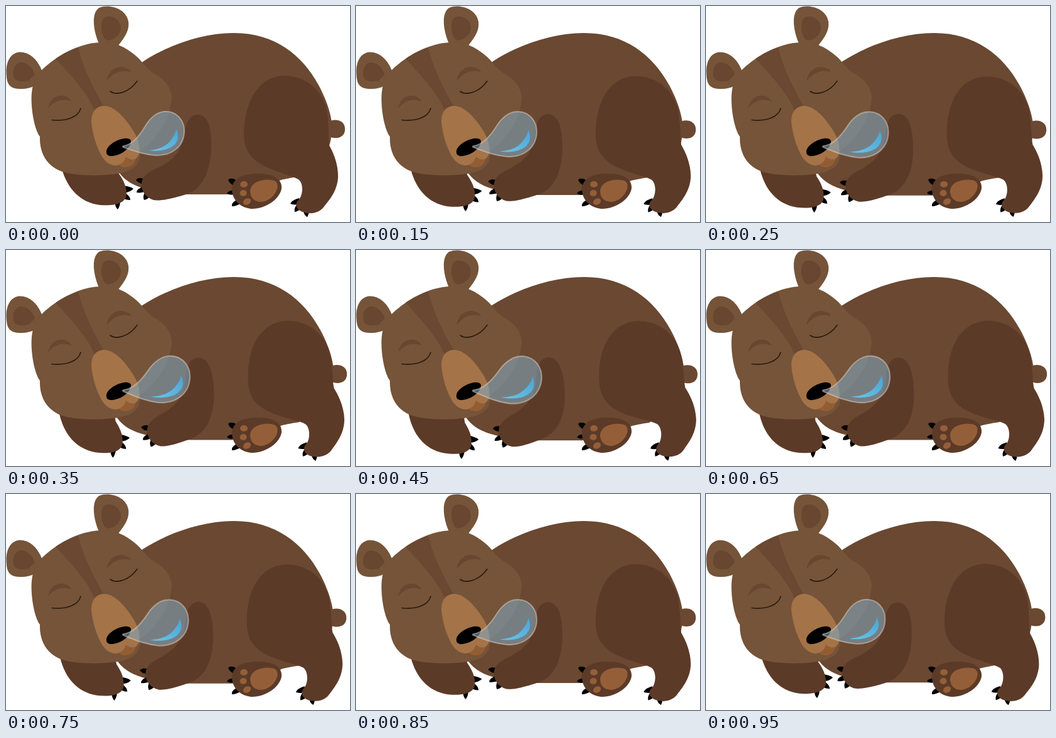
Write an HTML page that moves like this. It is 548x344 px and loops after 1000 ms.

```html
<!DOCTYPE html>
<html lang="en">
<head>
<meta charset="utf-8">
<title>Sleeping bear</title>
<style>
  html, body { margin: 0; width: 100%; height: 100%; overflow: hidden; background: #fff; }
  svg { display: block; width: 548px; height: 344px; }
  .body { fill: #6a4831; }
  .limb { fill: #5c3a28; }
  .head { fill: #755439; }
  .shade { fill: #684630; }
  .pad { fill: #945f38; }
  .claw { fill: #000; }
  .lid { fill: none; stroke: #2b1a0d; stroke-width: 1.6; stroke-linecap: round; }
</style>
</head>
<body>
<svg viewBox="0 0 548 344">
  <defs>
    <linearGradient id="shine" x1="0" y1="1" x2="1" y2="0">
      <stop offset="0" stop-color="#6cc4e6"/>
      <stop offset="1" stop-color="#4aa6d6"/>
    </linearGradient>
  </defs>

  <g id="torso" class="body">
    <path d="M514 184C523 179 540 181 540 196C540 210 526 213 515 208Z"/>
    <path d="M200 103L219 88C259 62 313 43 363 43C428 43 472 78 498 126C512 152 518 174 519 188C519 204 518 214 515 222L465 272C455 273 448 275 438 277L400 296L360 300L290 300C262 299 240 297 218 290C199 284 187 276 178 262L160 230Z"/>
  </g>

  <g id="hindLeg">
    <g class="claw">
      <path d="M467 306C460 308 455 310 453 315C459 317 464 317 468 314Z"/>
      <path d="M464 316C460 320 459 324 460 328C465 327 469 324 471 321Z"/>
      <path d="M474 326C474 330 476 334 480 336C482 332 483 329 482 326Z"/>
    </g>
    <path class="limb" d="M443 111C478 111 504 134 511 165C515 190 513 208 515 222C525 240 529 256 529 272C528 294 516 308 507 319C500 329 487 332 476 329C462 326 458 315 467 308C473 300 474 284 467 277C460 272 445 269 420 259C388 245 379 228 379 203C380 152 402 112 443 111Z"/>
  </g>

  <g>
    <g class="claw">
      <path d="M366 277C361 274 356 274 354 277C356 282 360 285 364 286Z"/>
      <path d="M363 293C358 294 354 295 352 298C355 301 360 301 364 300Z"/>
      <path d="M367 309C362 312 359 315 360 319C365 319 369 317 373 315Z"/>
    </g>
    <path class="limb" d="M360 293C359 272 383 266 403 267C428 267 440 277 439 290C437 307 414 323 392 323C374 322 361 310 360 293Z"/>
    <g class="pad">
      <path d="M389 295C390 280 408 276 420 277C431 277 434 283 432 291C428 304 416 312 405 312C394 311 389 304 389 295Z"/>
      <ellipse cx="379" cy="284" rx="6" ry="5"/>
      <ellipse cx="378" cy="298" rx="5.5" ry="5"/>
      <ellipse cx="384" cy="311.5" rx="6.5" ry="4.8" transform="rotate(-30 384 311.5)"/>
    </g>
  </g>

  <g id="leftArm">
    <g class="claw">
      <path d="M187 286C193 287 199 288 203 291C199 295 194 297 189 297Z"/>
      <path d="M190 298C195 301 198 305 198 309C193 309 189 308 186 305Z"/>
      <path d="M174 311C173 316 175 321 178 324C181 320 182 315 182 310Z"/>
    </g>
    <path class="limb" d="M89 260C98 290 117 313 150 317C178 319 192 312 192 299C192 287 187 277 179 266L172 235L90 235Z"/>
  </g>

  <g id="rightArm">
    <g class="claw">
      <path d="M219 275C215 273 209 274 207 277C210 281 214 283 218 283Z"/>
      <path d="M218 288C212 290 208 293 208 297C213 298 218 297 222 295Z"/>
      <path d="M222 296C219 300 218 304 220 309C225 308 228 305 231 302Z"/>
    </g>
    <path class="limb" d="M305 173C322 173 328 195 327 225C326 264 312 292 287 300C268 306 247 311 235 309C222 305 215 294 216 282C217 270 228 264 239 259C257 251 271 240 277 227C287 206 283 174 305 173Z"/>
  </g>

  <path class="head" d="M150 64C139 42 135 12 148 3C164 -4 192 4 195 25C197 40 188 51 178 64Z"/>
  <path class="shade" d="M157 52C149 37 151 19 160 17C171 15 182 22 183 34C183 45 173 54 162 55Z"/>
  <path class="head" d="M58 105C50 82 33 71 18 74C3 78 -1 96 1 113C2 127 9 132 23 132C33 132 41 130 47 126Z"/>
  <path class="shade" d="M46 109C41 96 32 89 22 90C12 93 9 105 13 115C17 121 28 121 36 119Z"/>

  <path class="head" d="M150 58C176 56 196 69 212 84C221 94 228 104 240 110C255 119 263 131 264 146C263 174 246 207 214 231C215 256 199 265 170 268C145 271 108 270 90 264C66 256 53 235 54 208C44 194 39 158 41 138C43 120 49 109 58 101C80 80 116 59 150 58Z"/>
  <path class="body" d="M79 84C90 76 103 70 115 66C121 91 133 121 156 160L141 166C130 139 104 111 79 84Z"/>
  <path class="shade" d="M67 163C70 148 80 141 92 143C98 144 103 148 104 152C91 147 79 149 67 163Z"/>
  <path class="shade" d="M160 120C163 104 172 97 184 97C192 98 198 101 199 105C186 101 172 104 160 120Z"/>
  <path class="lid" d="M73 181.500C94 184 115 178 119 163M166 136C176 143 196 138 209 119.500"/>

  <path d="M170 238C174 252 182 257 191 257C201 256 206 250 207 240Z" fill="#935d34"/>
  <path d="M155 159C172 158 190 178 203 199C214 217 216 236 207 243C201 246 195 243 191 240C189 248 183 253 175 254C167 254 159 249 153 240C143 223 137 200 136 183C136 169 143 160 155 159Z" fill="#a57348"/>
  <path d="M160 233C159 224 174 213 188 211C198 210 201 214 198 220C194 230 181 238 169 239C163 239 160 237 160 233Z"/>

  <g id="bubble">
    <path d="M187 223C201 221 212 208 222 191C231 176 243 168 255 168C272 168 284 182 284 199C284 222 266 238 240 238C220 237 205 231 187 225Q185 224 187 223Z" fill="#80afca" fill-opacity=".53" stroke="#e1d2c4" stroke-opacity=".5" stroke-width="2"/>
    <path d="M271 196C276 206 275 216 266 223C256 230 242 232 228 230C246 228 257 222 263 213C267 208 270 203 271 196Z" fill="url(#shine)"/>
  </g>
</svg>
<script>
  const LOOP = 1000, STEP = 50;
  const get = id => document.getElementById(id);

  const spin = (deg, x, y) => p => `rotate(${deg * p} ${x} ${y})`;
  const grow = (kx, ky, x, y) => p =>
    `translate(${x} ${y}) scale(${1 + kx * p} ${1 + ky * p}) translate(${-x} ${-y})`;
  const both = (a, b) => p => a(p) + b(p);

  const parts = [
    [get('torso'), grow(0.025, 0.014, 360, 43)],
    [get('hindLeg'), spin(-4.3, 480, 80)],
    [get('leftArm'), spin(4.8, 58, 196)],
    [get('rightArm'), spin(-6.3, 285, 170)],
    [get('bubble'), both(spin(5.5, 187, 223), grow(0.11, 0.11, 187, 223))]
  ];

  // Breath rises evenly for half the loop, then falls back.
  function draw(ms) {
    const t = Math.floor((ms % LOOP) / STEP) * STEP;
    const breath = 1 - Math.abs(1 - 2 * t / LOOP);
    for (const [el, pose] of parts) el.setAttribute('transform', pose(breath));
  }

  const start = performance.now();
  function tick() {
    draw(performance.now() - start);
    requestAnimationFrame(tick);
  }
  draw(0);
  requestAnimationFrame(tick);
</script>
</body>
</html>
```
